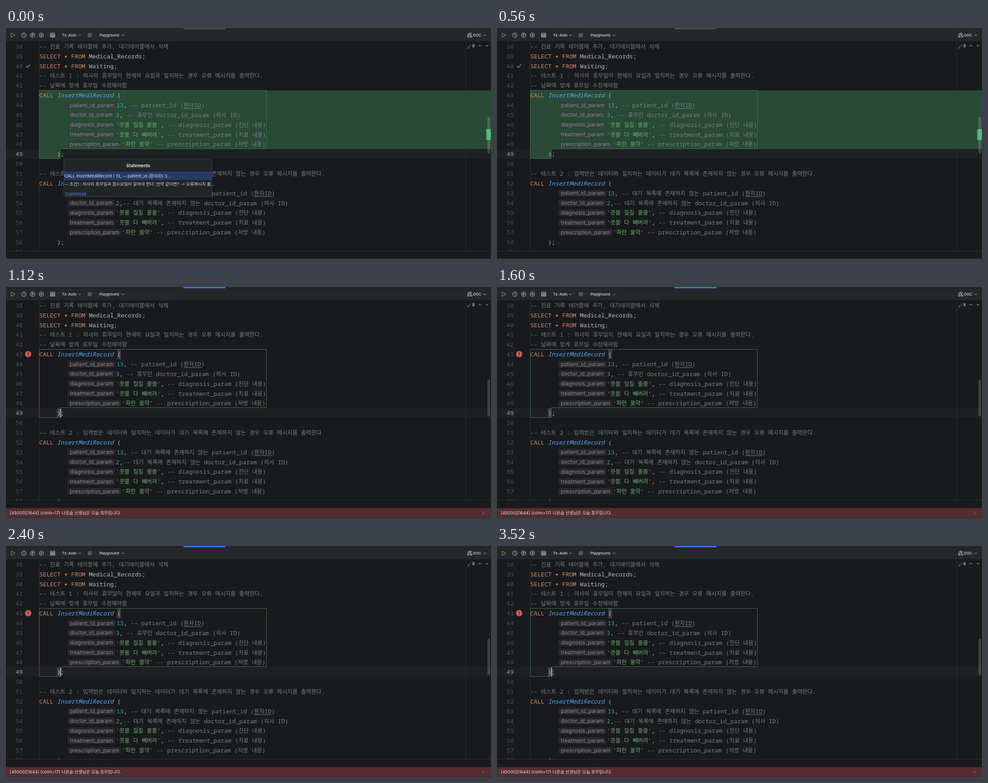
These frames come from a looping animation (1085x516 px, 3600 ms). An HTML page:

```html
<!DOCTYPE html>
<html lang="ko">
<head>
<meta charset="utf-8">
<title>SQL console</title>
<style>
html, body { margin: 0; width: 100%; height: 100%; overflow: hidden; background: #191a1d; }
svg { display: block; }
text { white-space: pre; fill: #bcbec4; }
.code { font: 500 13.2px "Noto Sans Mono", "Noto Sans CJK KR", monospace; }
.hangul { font-size: 12.45px; font-family: "Noto Sans CJK KR", sans-serif; }
.ui { font: 9.5px Inter, "Noto Sans CJK KR", sans-serif; fill: #dfe1e5; }
.bar { font-size: 8.15px; font-weight: 500; }
.title { font-weight: 700; text-anchor: middle; }
.hint { font: 12.1px Inter, sans-serif; fill: #868a91; }
.comment { fill: #7a7e85; }
.string { fill: #6aab73; }
.keyword { fill: #cf8e6d; }
.func { fill: #56a8f5; font-style: italic; }
.number { fill: #2aacb8; }
.star { fill: #e8ba6a; baseline-shift: -2.5px; }
.num { fill: #4b5059; font-weight: 400; }
.num.current { fill: #a1a3ab; }
.line { fill: none; stroke: #ced0d6; stroke-width: 1; }
</style>
</head>
<body>
<svg width="1085" height="516" viewBox="0 0 1085 516">
  <rect width="1085" height="516" fill="#191a1d"/>
  <rect y="270.4" width="1085" height="21.6" fill="#1f2024"/>
  <path d="M74.5 29V500M1028.5 29V500" stroke="#2b2d31"/>
  <g class="before">
    <path d="M75 139.4H1085V270.4H122V292H75Z" fill="#294a35"/>
    <path d="M44.5 85l3.2 3.2 6-6.7" fill="none" stroke="#5fad65" stroke-width="1.7"/>
  </g>
  <g class="after">
    <path d="M249 140h8v21h-8zM114 271h8v21h-8z" fill="#3f4146"/>
    <circle cx="49.5" cy="150" r="7" fill="#d75a5a"/>
    <path d="M49.5 146v5M49.5 152.5v2" stroke="#2a1c1e" stroke-width="1.7"/>
  </g>
  <path d="M74.5 139.5H582.5V269.5H121.5V291.5H74.5Z" fill="none" stroke="#407249"/>
  <g id="editor"></g>
  <rect id="caret" x="121.7" y="272.5" width="1.6" height="18.5" fill="#ced0d6"/>

  <path d="M1032.5 40l2.700 2.700 5-6M1032 44.500h5" fill="none" stroke="#5fad65"/>
  <text class="ui" x="1043" y="42.5">8</text>
  <path class="line" d="M1057 41l3-3 3 3M1073 38l3 3 3-3"/>
  <rect class="before" x="1074" y="226" width="11" height="24" fill="#43ad68"/>
  <rect id="thumb" x="1077" width="6" height="82" rx="3" fill="#fff" fill-opacity=".17"/>

  <g id="popup">
    <rect x="129.5" y="292.5" width="331" height="84" rx="4" fill="#222427" stroke="#3f4146"/>
    <rect x="130" y="321" width="330" height="18.5" fill="#273a68"/>
    <text class="ui title" x="296" y="311.3">Statements</text>
    <text class="ui" x="130.5" y="333.8">CALL InsertMediRecord ( 13, -- patient_id (환자ID) 3...</text>
    <text class="ui" x="130.5" y="352">-- 조건1 : 의사의 휴무일과 접수요일이 달라야 한다. 만약 같다면? -&gt; 오류메시지 출...</text>
    <text class="ui" x="132" y="373.5" style="fill:#548af7">Customize</text>
  </g>

  <g class="before">
    <rect y="498" width="1085" height="18" fill="#191a1d"/>
    <path d="M0 498.5H1085M0 514.5H1085" stroke="#2d2f33"/>
  </g>
  <g class="after">
    <rect y="476" width="1085" height="40" fill="#191a1d"/>
    <path d="M0 476.5H1085" stroke="#2d2f33"/>
    <rect y="494" width="1085" height="21.5" fill="#562d30"/>
    <text class="ui" x="8.5" y="508.3">[45000][1644] (conn=17) 나온솔 선생님은 오늘 휴무입니다.</text>
    <path d="M1065.5 502.5l5 5m0-5l-5 5" stroke="#8b6365"/>
  </g>

  <rect width="1085" height="29" fill="#25272a"/>
  <path d="M0 3.5H1085M0 29.5H1085" stroke="#1c1d20"/>
  <rect id="tab" x="397" width="94" height="3"/>
  <path d="M93.5 10v12M116.5 10v12M173.5 10v12M200.5 10v12" stroke="#34363a"/>
  <path d="M11.5 11.5L20 16l-8.500 4.700z" fill="none" stroke="#57a05e" stroke-width="1.2"/>
  <g class="line">
    <circle cx="40" cy="16" r="5"/><path d="M40 13v3.300l2 1.200"/>
    <circle cx="59.5" cy="16" r="5"/><path d="M58.2 19v-5.500h1.600a1.600 1.600 0 0 1 0 3.200h-1.600"/>
    <path d="M79 10.8l4.500 2.600v5.200l-4.500 2.600-4.500-2.600v-5.200z"/><circle cx="79" cy="16" r="1.7"/>
    <path d="M99.5 11.5h9.500v9h-9.500zM99.5 14.5h9.500M99.5 17.5h9.500M102.7 14.5v6M106 14.5v6"/>
    <path d="M161.5 15l2.800 2.700 2.800-2.700M258.7 15l2.800 2.700 2.800-2.700M1068.5 15l2.800 2.700 2.800-2.700"/>
    <path d="M1036.5 11.5h4v3h-4zM1032.5 17.5h3.500v3h-3.500zM1039 17.5h3.500v3h-3.500zM1036.5 13h-3v4.500M1038.5 14.5v3"/>
  </g>
  <rect x="183" y="11.5" width="9" height="9" rx="1" fill="#55575c"/>
  <text class="ui bar" x="125.5" y="19">Tx: Auto</text>
  <text class="ui bar" x="209" y="19">Playground</text>
  <text class="ui bar" x="1045" y="19">DOC</text>
</svg>
<script>
const LOOP = 3600, POPUP_END = 320, RESULT = 640, BLINK = 640;
const FIRST_LINE = 38, CURRENT_LINE = 49, PITCH = 21.85, CODE_X = 74.6, CELL = 7.92;
const $ = selector => document.querySelector(selector);
const editor = $('#editor');

const call = (patient, doctor) => [
  'CALL InsertMediRecord (',
  ['patient_id_param', 109.2, `13, -- ${patient}patient_id (환자ID)`],
  ['doctor_id_param', 107.6, doctor],
  ['diagnosis_param', 107.6, "'콧물 질질 줄줄', -- diagnosis_param (진단 내용)"],
  ['treatment_param', 107.6, "'콧물 다 빼버려', -- treatment_param (치료 내용)"],
  ['prescription_param', 121.4, "'파란 물약' -- prescription_param (처방 내용)"],
  '     );',
];
const absent = '대기 목록에 존재하지 않는 ';
const lines = [
  '-- 진료 기록 테이블에 추가, 대기테이블에서 삭제',
  'SELECT * FROM Medical_Records;',
  'SELECT * FROM Waiting;',
  '-- 테스트 1 : 의사의 휴무일이 현재의 요일과 일치하는 경우 오류 메시지를 출력한다.',
  '-- 날짜에 맞게 휴무일 수정해야함',
  ...call('', '3, -- 휴무인 doctor_id_param (의사 ID)'),
  '',
  '-- 테스트 2 : 입력받은 데이터와 일치하는 데이터가 대기 목록에 존재하지 않는 경우 오류 메시지를 출력한다.',
  ...call(absent, `2,-- ${absent}doctor_id_param (의사 ID)`),
  '',
];

function add(parent, tag, attrs, content = '') {
  const node = document.createElementNS('http://www.w3.org/2000/svg', tag);
  for (const key in attrs) node.setAttribute(key, attrs[key]);
  node.textContent = content;
  return parent.appendChild(node);
}

const TOKENS = /(?<comment>--.*)|(?<string>'[^']*')|(?<keyword>SELECT|FROM|CALL)|(?<func>InsertMediRecord)|(?<number>\b\d+)|(?<star>\*)|[^]/g;

function drawCode(x, y, source) {
  const text = add(editor, 'text', { class: 'code', x, y });
  for (const { 0: token, groups } of source.matchAll(TOKENS)) {
    const kind = Object.keys(groups).find(name => groups[name]) || '';
    for (const run of token.match(/[가-힣]+|[^가-힣]+/g))
      add(text, 'tspan', { class: kind + (/[가-힣]/.test(run) ? ' hangul' : '') }, run);
  }
}

function drawWave(x, y) {
  let d = `M${x} ${y}`;
  for (let i = 0; i < 20; i++) d += `l2 ${i % 2 ? 2 : -2}`;
  add(editor, 'path', { d, fill: 'none', stroke: '#6aab73' });
}

const widthOf = s => [...s].reduce((w, c) => w + (/[가-힣]/.test(c) ? 11.454 : CELL), 0);

lines.forEach((line, i) => {
  const y = 45.9 + i * PITCH, number = FIRST_LINE + i;
  add(editor, 'text', { class: 'code num' + (number === CURRENT_LINE ? ' current' : ''), x: 21.5, y }, number);
  if (typeof line === 'string') return drawCode(CODE_X, y, line);
  const [param, advance, source] = line, x = CODE_X + 8 * CELL;
  add(editor, 'rect', { x, y: y - 12, width: advance - 1.8, height: 15, rx: 3, fill: '#3a3b40', 'fill-opacity': 0.42 });
  add(editor, 'text', { class: 'hint', x: x + 4.8, y: y - 0.4 }, param);
  drawCode(x + advance, y, source);
  const target = source.indexOf('환자ID');
  if (target > 0) drawWave(x + advance + widthOf(source.slice(0, target)), y + 4);
});

function show(selector, visible) {
  for (const node of document.querySelectorAll(selector)) node.style.display = visible ? '' : 'none';
}

function render() {
  const t = performance.now() % LOOP, done = t >= RESULT;
  show('.before', !done);
  show('.after', done);
  show('#popup', t < POPUP_END);
  show('#caret', done && Math.floor((t - RESULT) / BLINK) % 2 === 0);
  $('#tab').setAttribute('fill', done ? '#3574f0' : '#4b4d52');
  $('#thumb').setAttribute('y', done ? 206.5 : 198.5);
  requestAnimationFrame(render);
}
render();
</script>
</body>
</html>
```
